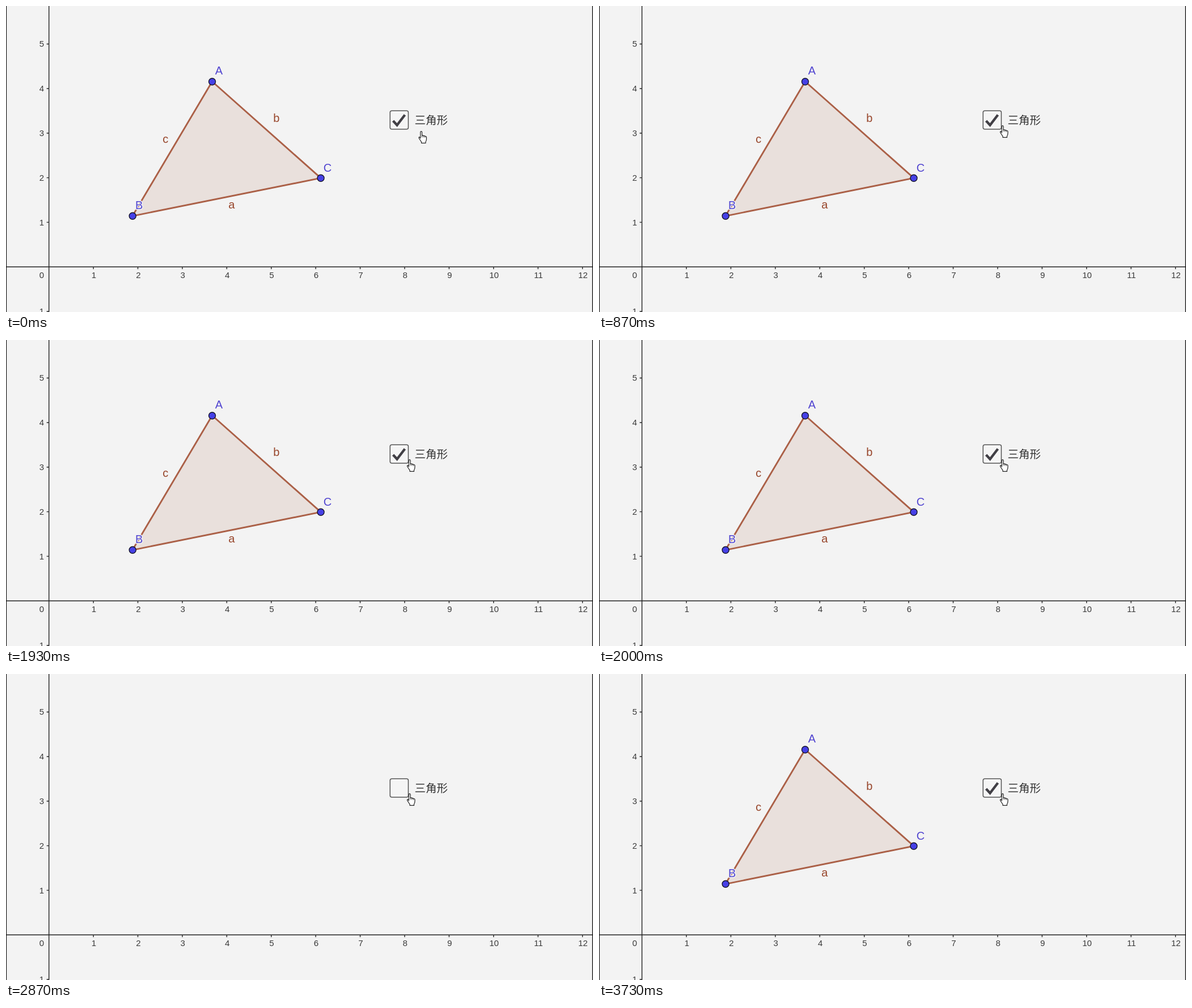
These frames come from a looping animation (1035x541 px, 3910 ms). An HTML page:

```html
<!DOCTYPE html>
<html lang="zh">
<meta charset="utf-8">
<title>三角形</title>
<style>
  html, body { margin: 0; height: 100%; overflow: hidden; background: #f3f3f3; }
  svg { display: block; width: 1035px; height: 541px; }
  text { font-family: "Liberation Sans", Arial, sans-serif; }
  #axes text { font-size: 15px; fill: #3a3a3a; }
  #axes path { stroke: #222; stroke-width: 1.4; fill: none; }
  #shape text { font-size: 20px; text-anchor: middle; paint-order: stroke; stroke: #f3f3f3; stroke-width: 3px; stroke-linejoin: round; }
  .point { fill: #5145d0; }
  .side { fill: #97452a; }
  circle { fill: #4640e6; stroke: #15152a; stroke-width: 1.4; }
  #name { font: 19.5px "Noto Sans CJK SC", "Noto Sans CJK JP", "Noto Sans CJK", sans-serif; fill: #333; }
</style>
<svg viewBox="0 0 1035 541">
  <g id="axes"></g>
  <rect x="677.2" y="185.2" width="32.2" height="32.6" rx="3" fill="#f5f5f5" stroke="#555" stroke-width="1.5"/>
  <text id="name" x="720.5" y="209">三角形</text>
  <g id="shape">
    <path d="M363.5 133.5L223 371.3L555 304.2Z" fill="#e9e0dc" stroke="#ab6047" stroke-width="2.9" stroke-linejoin="round"/>
    <text class="side" x="397.7" y="357.5">a</text>
    <text class="side" x="476.7" y="205">b</text>
    <text class="side" x="281.3" y="241.5">c</text>
    <text class="point" x="375.5" y="121">A</text>
    <text class="point" x="234.7" y="359">B</text>
    <text class="point" x="567" y="292.7">C</text>
    <circle cx="363.5" cy="133.8" r="6"/>
    <circle cx="223.2" cy="371.3" r="6"/>
    <circle cx="555" cy="304.3" r="6"/>
    <path d="M682.5 203L689.5 210.5L703.3 192.5" fill="none" stroke="#413f45" stroke-width="4.4"/>
  </g>
  <g id="hand" stroke="#222" stroke-width="1.2" stroke-linejoin="round">
    <path fill="#fff" d="M3.2 13V2.2a1.4 1.5 0 0 1 2.8 0V8q1.5-1 2.7.6q1.6-.8 2.6.8q2-.6 2.6 1.6V14q0 3-1.5 5V21.3H5V19.3Q3 16.5.8 13Q0 11 1.2 10.6Q2.4 10.8 3.2 13Z"/>
    <path fill="none" stroke-width=".9" d="M6 8v3.2M8.7 8.6v2.8M11.3 9.4v2.4"/>
  </g>
</svg>
<script>
  const LOOP = 3910, UNIT_X = 78.4, UNIT_Y = 78.8, OX = 75.7, OY = 461.2;
  const $ = id => document.getElementById(id);

  let ticks = `M0 ${OY}H1035M${OX} 0V541M.5 0V541M1034.3 0V541`;
  let labels = `<text x="67" y="481" text-anchor="end">0</text>`;
  for (let i = 1; i <= 12; i++) {
    const x = OX + i * UNIT_X;
    ticks += `M${x} ${OY}v4`;
    labels += `<text x="${x + .8}" y="481" text-anchor="middle">${i}</text>`;
  }
  for (const i of [-1, 1, 2, 3, 4, 5]) {
    const y = OY - i * UNIT_Y;
    ticks += `M${OX} ${y}h-4`;
    labels += `<text x="67" y="${y + 5.2}" text-anchor="end">${String(i).replace("-", "–")}</text>`;
  }
  $("axes").innerHTML = `<path d="${ticks}"/>${labels}`;

  // Share of a move done at t, advancing in n discrete steps.
  const stepped = (t, start, gap, n) =>
    Math.max(0, Math.min(n, Math.floor((t - start) / gap) + 1)) / n;

  function draw(now) {
    const t = now % LOOP;
    const near = stepped(t, 330, 46, 4), far = stepped(t, 630, 40, 7);
    const x = 727.5 - 5 * near - 15.5 * far;
    const y = 221 - 7.5 * near - 2.5 * far;
    $("hand").setAttribute("transform", `translate(${x} ${y})`);
    const hidden = (t >= 1000 && t < 1930) || (t >= 2800 && t < 3670);
    $("shape").style.display = hidden ? "none" : "";
    requestAnimationFrame(draw);
  }
  draw(0);
</script>
</html>
```
